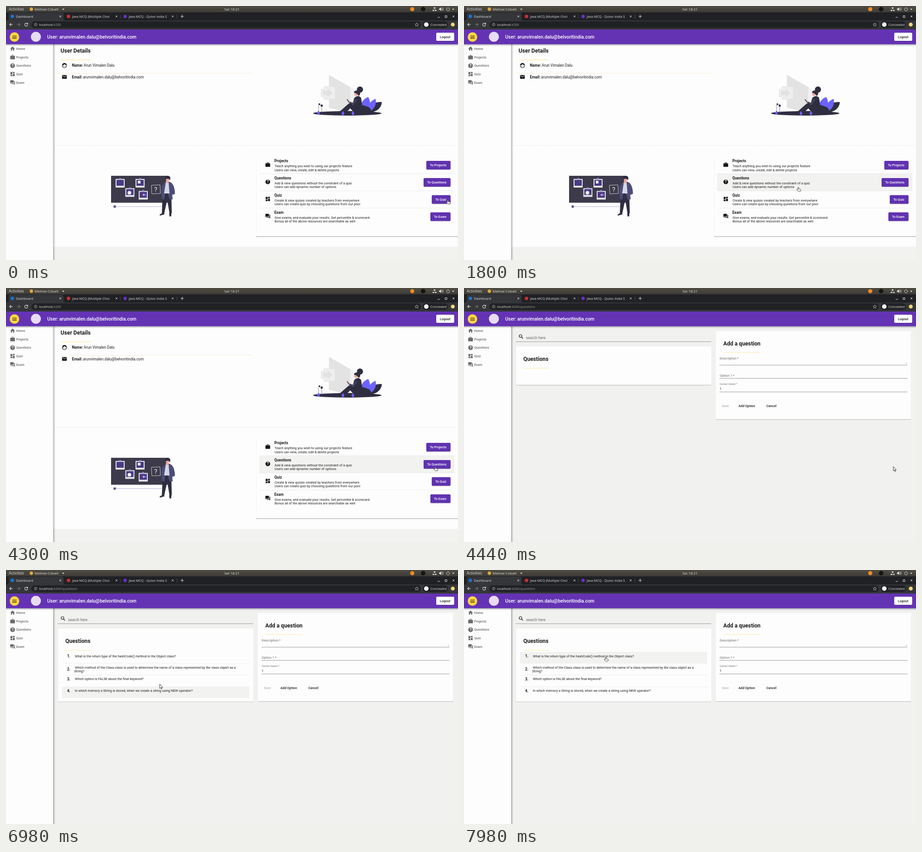
These frames come from a looping animation (998 px wide and 561 px high, 8 s). An HTML page:

```html
<!DOCTYPE html>
<html lang="en">
<head>
<meta charset="utf-8">
<title>Quiz dashboard</title>
<style>
  html, body { margin: 0; width: 100%; height: 100%; overflow: hidden; background: #f2f2f1; }
  svg { display: block; width: 998px; height: 561px; font-family: Roboto, sans-serif; }
  .ui { font-family: "Open Sans", "Noto Sans", sans-serif; }
</style>
</head>
<body>
<svg id="stage" viewBox="0 0 998 561"></svg>
<script>
const DURATION = 8000;
const PAGE_SWAP = 4290;
const LIST_LOADED = 4700;
const INK = '#1c1c1c', GREY = '#6b6b6b', PURPLE = '#6433b4', DARK = '#2f2e41', VIOLET = '#6c63ff';
const EMAIL = 'arunvimalen.dalu@belvoritindia.com';

// Markup helpers
const rect = (x, y, w, h, fill, extra = '') =>
  `<rect x="${x}" y="${y}" width="${w}" height="${h}" fill="${fill}" ${extra}/>`;
const circle = (x, y, r, fill, extra = '') =>
  `<circle cx="${x}" cy="${y}" r="${r}" fill="${fill}" ${extra}/>`;
const path = (d, fill, extra = '') => `<path d="${d}" fill="${fill}" ${extra}/>`;
const stroke = (d, color, width = 1, extra = '') =>
  `<path d="${d}" fill="none" stroke="${color}" stroke-width="${width}" ${extra}/>`;
const text = (x, y, str, size = 7.25, fill = INK, weight = 400, extra = '') =>
  `<text x="${x}" y="${y}" font-size="${size}" fill="${fill}" font-weight="${weight}" ${extra}>${str}</text>`;
const ui = (x, y, str, size, fill = '#dedede', extra = '') => text(x, y, str, size, fill, 400, `class="ui" ${extra}`);
const group = (id, content) => `<g id="${id}">${content}</g>`;

// Icons live on a 24-unit grid, centred on (x, y)
const ICONS = {
  home: 'M10 20v-6h4v6h5v-8h3L12 3 2 12h3v8z',
  work: 'M20 6h-4V4q0-2-2-2h-4q-2 0-2 2v2H4Q2 6 2 8v11q0 2 2 2h16q2 0 2-2V8q0-2-2-2zm-6 0h-4V4h4z',
  board: 'M3 13h8V3H3zm0 8h8v-6H3zm10 0h8V11h-8zm0-18v6h8V3z',
  forum: 'M21 6h-2v9H6v2q0 1 1 1h11l4 4V7q0-1-1-1zm-4 6V3q0-1-1-1H3Q2 2 2 3v14l4-4h10q1 0 1-1z',
  mail: 'M20 4H4Q2 4 2 6v12q0 2 2 2h16q2 0 2-2V6q0-2-2-2zm0 4l-8 5-8-5V6l8 5 8-5z',
};
function icon(name, x, y, fill) {
  if (name === 'help')
    return circle(x, y, 5.2, fill) + text(x, y + 3, '?', 8.5, '#fff', 700, 'text-anchor="middle"');
  return path(ICONS[name], fill, `transform="translate(${x - 6.24} ${y - 6.24}) scale(.52)"`);
}

function browser() {
  const tab = (x, title, color, close) =>
    circle(x, 23, 3.7, color) + ui(x + 8, 25.6, title, 7.4) +
    stroke(`M${close - 2} 21l4 4m0-4l-4 4`, '#e0e0e0', .9);
  return rect(0, 0, 998, 14, 'url(#panel)') +
    ui(6, 10, 'Activities', 8.2) + circle(56, 7, 3.8, '#e0a83a') + ui(63, 10, 'Mellow Cobalt', 8) +
    path('M124 6h5l-2.5 3z', '#ddd') + ui(482, 10, 'Sat 18:21', 7.9) +
    circle(897, 7, 4.6, '#f08a24') + circle(921, 7, 5, '#151515') +
    path('M944.500 3h3.500v3h-3.500zM942 8.500h3.500v2.500H942zM947 8.500h3.500v2.500H947z', '#ddd') +
    path('M956 5.500h2l3-2.500v8l-3-2.500h-2z', '#ddd') + stroke('M962.500 4.500q2 2.500 0 5M964 3q3 4 0 8', '#ddd', .8) +
    stroke('M974 4.500a3.500 3.500 0 1 0 4 0M976 2.500v4', '#ddd', 1) + path('M985 6h5l-2.500 3z', '#ddd') +
    rect(0, 14, 998, 18, '#202124') + path('M3 32Q6 32 6 28V18q0-3 3-3H124q3 0 3 3V28q0 4 3 4z', '#35363a') +
    rect(0, 32, 998, 20, '#35363a') +
    tab(14, 'Dashboard', '#1976d2', 120) + tab(138, 'Java MCQ (Multiple Choi', '#d32f2f', 244) +
    tab(263, 'Java MCQ - Quivo India S', '#6f2bd0', 368) +
    stroke('M252.500 19v9M377.500 19v9', '#55565a', .7) + stroke('M385.500 23h7M389 19.500v7', '#ddd', 1) +
    stroke('M953 25h5M969.500 21.500h4v4h-4zM986 21l4 4m0-4l-4 4', '#ddd', 1) +
    stroke('M15 41H8m3-3l-3 3 3 3', '#e3e3e3', 1.1) + stroke('M24 41h7m-3-3l3 3-3 3', '#77787c', 1.1) +
    stroke('M47.500 39.500a3.300 3.300 0 1 0 .3 2.500M48 37.500v2.500h-2.500', '#e3e3e3', 1.1) +
    rect(56, 34, 860, 14.500, '#202124', 'rx="7.2"') +
    circle(65.500, 41, 3, 'none', 'stroke="#bbb" stroke-width=".8"') + stroke('M65.500 40.500v2M65.500 39v.8', '#ccc', .8) +
    ui(73, 43.700, 'localhost:<tspan fill="#9c9da0">4200<tspan id="route">/questions</tspan></tspan>', 7.2) +
    path('M907 37.300l1.200 2.500 2.700.3-2 1.900.6 2.700-2.500-1.400-2.500 1.400.6-2.700-2-1.900 2.700-.3z', 'none', 'stroke="#ddd" stroke-width=".7"') +
    rect(920, 34, 56, 14.500, '#202124', 'rx="7.2"') + circle(928, 41, 5, '#f1f1f1') +
    ui(937, 43.700, 'Concealed', 7.4) + circle(986.500, 41, 4.300, '#f2d675');
}

function header() {
  return rect(0, 84, 998, 5, 'url(#down)') + rect(0, 52, 998, 32.500, PURPLE) +
    circle(18.700, 68.500, 10.500, '#ffd740') + stroke('M14 66h9.500M14 68.700h9.500M14 71.400h9.500', '#222', 1.1) +
    circle(66, 68, 11, '#e6dcf5') + text(91, 71.800, 'User: ' + EMAIL, 10.4, '#fff', 500) +
    rect(950, 59, 39.500, 18, '#fff', 'rx="2" filter="url(#lift)"') + text(958, 71, 'Logout', 7.4, INK, 500);
}

function sidebar() {
  const items = [['Home', 'home'], ['Projects', 'work'], ['Questions', 'help'], ['Quiz', 'board'], ['Exam', 'forum']];
  return rect(104, 84, 5, 477, 'url(#right)') + rect(0, 84, 104, 477, '#fdfdfd') +
    items.map(([label, name], i) => {
      const y = 94.300 + i * 18.700;
      return icon(name, 14.500, y, GREY) + text(22.500, y + 2.600, label, 7.28, GREY, 500);
    }).join('');
}

function reader() {
  return path('M713 152L760 179V236L713 225z', '#e3e3e3') + path('M760 179l17 10v40l-17 6z', '#f1f1f1') +
    path('M696 184h6v-6h25v28h-25v-6h-6z', '#eee', 'stroke="#e0e0e0"') +
    path('M700 187h10v-5l11 10-11 10v-5h-10z', '#e2e2e2') +
    `<ellipse cx="753.500" cy="237" rx="75.500" ry="5" fill="${DARK}"/>` +
    path('M795 234Q798 212 830 212Q828 231 806 235z', DARK) +
    path('M786 230Q780 208 800 201Q809 219 797 233z', VIOLET) + path('M797 232Q800 211 816 205Q820 222 804 233z', VIOLET) +
    path('M774 236Q780 214 794 221Q807 223 807 236z', DARK) +
    circle(773, 194, 4.500, '#f3a6a0') + circle(781.500, 184.500, 6.800, DARK) +
    path('M768 191Q770 185 778 187Q786 191 779 199Q776 193 768 191z', DARK) +
    path('M769 203Q778 195 784 203L789 235H769L766 214z', DARK) +
    path('M787 237L765 217Q760 212 755 217L738 232 722 235 725 239H747L760 226 771 238z', DARK) +
    stroke('M774 206L767 216 757 212', '#45435c', 3.500) + circle(757, 211, 2.200, '#f3a6a0') +
    stroke('M753 206l4 6', DARK, 1.5) +
    stroke('M690 237V219M697 237V221', '#6b6a80', .8) + circle(692, 217, 2, DARK) + circle(697, 220, 2.500, DARK) +
    [[690, 237], [766, 238], [744, 238]].map(([x, y]) => path(`M${x} ${y - 6}q5 5 1 9h-2q-4-4 1-9z`, VIOLET)).join('');
}

function teacher() {
  const polaroid = ([x, y]) => rect(x, y, 20, 19, '#e6e6ea') + rect(x + 2, y + 2, 16, 13, '#4b3a86') + rect(x + 8, y - 2, 4, 3, '#8f88d8');
  return rect(232, 375, 126, 59.500, '#3c3a4b') +
    [[242, 382], [286, 382], [263.500, 402.500], [293, 408.500]].map(polaroid).join('') +
    rect(291, 386, 6, 6, '#e8e8f0') + circle(272.500, 412.500, 4, '#eee') + circle(304, 417, 2.300, '#f0a0b0') + circle(308, 417, 2, VIOLET) +
    stroke('M321 396l19-1 1 19-19 1z', '#ddd', .9) + text(330.500, 410.500, '?', 15, '#eee', 400, 'text-anchor="middle"') +
    stroke('M240 443H344', '#aaa2d6', .9) + rect(237.500, 440.500, 5, 5, '#5c4a9c') +
    path('M346 414H365L366 458H361L356 428 349 460H344z', DARK) +
    path('M339 461q5-5 10-3l1 2-10 3zM360 458h5v6q-3 2-4 0z', DARK) +
    path('M350 390Q358 385 366 391Q373 399 373 415L367 417 368 427H361L353 400 350 427H345Q342 410 344 398z', '#4c4d78') +
    path('M353 389h6l2 25h-12z', '#d5d7e6') + path('M353 386h6v4q-3 3-6 0z', '#f3a6a0') +
    circle(357, 382, 4.500, '#f3a6a0') + path('M351 383Q351 374 358 375Q365 376 362 385Q360 379 351 383z', DARK);
}

function dashboard() {
  const rows = [
    ['Projects', 'work', 928, 'Teach anything you wish to using our projects feature', 'Users can view, create, edit &amp; delete projects'],
    ['Questions', 'help', 922, 'Add &amp; view questions without the constraint of a quiz', 'Users can add dynamic number of options'],
    ['Quiz', 'board', 940, 'Create &amp; view quizes created by teachers from everywhere', 'Users can create quiz by choosing questions from our pool'],
    ['Exam', 'forum', 937, 'Give exams, and evaluate your results. Get percentile &amp; scorecard.', 'Bonus all of the above resources are searchable as well'],
  ];
  const row = ([title, name, left, first, second], i) => {
    const y = 332.500 + i * 37.900;
    return rect(559, y, 431, 38, '#f2f2f1', `id="tile${i}"`) +
      (i ? stroke(`M559 ${y}H990`, '#e9e8ee', .8) : '') +
      icon(name, 578, y + 18, '#171717') + text(592.500, y + 12.500, title, 8.2, INK, 700) +
      text(593, y + 23.700, first) + text(593, y + 32, second) +
      rect(left, y + 9.500, 981.500 - left, 19, '#6031b0', 'rx="2" filter="url(#lift)"') +
      text(left + 8, y + 21.700, 'To ' + title, 7.28, '#fff', 500);
  };
  return rect(104, 84, 894, 448, '#fdfdfd') +
    text(120.500, 103, 'User Details', 12.2, INK, 700) + stroke('M121 119H186', '#ffe082', 1) +
    circle(129, 131.500, 4.700, 'none', 'stroke="#171717" stroke-width="1.1"') +
    path('M124 131Q128 131 129 128Q131 131 134 130Q133 126 129 126Q125 126 124 131z', '#171717') +
    circle(127.300, 132.500, .7, '#171717') + circle(130.700, 132.500, .7, '#171717') +
    text(145.500, 134, 'Name:', 8.3, INK, 700) + text(171.500, 134, 'Arun Vimalen Dalu', 8.3) +
    stroke('M113 148.500H545', '#f7f0cf', 1) + icon('mail', 129, 156.700, '#171717') +
    text(145.500, 159.500, 'Email:', 8.3, INK, 700) + text(170, 159.500, EMAIL, 8.3) +
    stroke('M106 308H998', '#e6e6ee', .9, 'stroke-dasharray="3 2"') +
    reader() + teacher() +
    stroke('M552.500 335V509', '#f0f0f2', .8) + stroke('M552 509.300H998', '#adada6', 1.2) + rows.map(row).join('');
}

const LIST_ROWS = [
  { top: 181, height: 25, base: 193, lines: ['What is the return type of the hashCode() method in the Object class?'] },
  { top: 206, height: 26, base: 221.700, lines: ['Which method of the Class.class is used to determine the name of a class represented by the class object as a', 'String?'] },
  { top: 232, height: 26, base: 243.700, lines: ['Which option is FALSE about the final keyword?'] },
  { top: 258, height: 25, base: 269.300, lines: ['In which memory a String is stored, when we create a string using NEW operator?'] },
];

function questions() {
  const listRow = ({ top, height, base, lines }, i) =>
    rect(123.500, top, 413.500, height, '#f2f2f1', `id="item${i}"`) +
    (i ? stroke(`M126 ${top}H537`, '#e9e9e9', .8) : '') +
    text(135, base + .3, `${i + 1}.`, 8.3, INK, 700) +
    lines.map((line, k) => text(k ? 150.500 : 152, lines.length > 1 ? 217.700 + k * 8.300 : base - .5, line)).join('');
  const underline = (y, left, right) => stroke(`M${left} ${y}H${right}`, '#8f8f8c', .9);
  return rect(104, 84, 894, 477, '#f1f1f0') +
    circle(124.800, 106, 3, 'none', `stroke="${INK}" stroke-width="1.2"`) + stroke('M127 108.200l3.200 3.200', INK, 1.4) +
    text(137, 113, 'search here', 8.3, GREY) + underline(118.600, 114, 546) +
    rect(114.500, 129, 431.500, 85, '#fdfdfd', 'id="card" rx="2" filter="url(#lift)"') +
    text(131, 161, 'Questions', 12.2, INK, 700) + stroke('M131 177.200H188', '#ffe9a0', 1) +
    group('list', LIST_ROWS.map(listRow).join('')) +
    rect(556, 95, 431.500, 195, '#fdfdfd', 'rx="2" filter="url(#lift)"') +
    text(572.500, 126.700, 'Add a question', 12.2, INK, 700) + stroke('M573 142.300H655', '#ffe9a0', 1) +
    text(564.500, 158.300, 'Description *', 7.28, GREY) + underline(170.300, 564, 979) + stroke('M975 168l3-3M977 168l1-1', '#888', .7) +
    text(564.500, 195.500, 'Option 1 *', 7.4, GREY) + underline(199.600, 564, 979) +
    text(564.500, 214, 'Correct Option *', 5.5, GREY) + text(564.500, 224.700, '1', 7.4) + underline(229.600, 564, 979) +
    text(569, 262.700, 'Save', 7.28, '#b5b3bd', 500) + text(606, 262.700, 'Add Option', 7.28, INK, 500) +
    text(667.500, 262.700, 'Cancel', 7.28, INK, 500);
}

const pointers = group('pointer',
  path('M0 0V9.500L2.200 7.500 3.600 10.800 5.200 10.100 3.800 7H6.600z', '#fff', 'id="arrow" stroke="#222" stroke-width=".9"') +
  path('M2 0q1 0 1 1V4l4 .8q1.200.3 1 1.700L7.400 9.500H1.600L-1.800 6.200q-.3-1.500 2.800-.5V1Q1 0 2 0z', '#fff', 'id="hand" stroke="#222" stroke-width=".9" transform="translate(-1.800 .3) scale(.92)"'));

const fade = (id, x2, y2) => `<linearGradient id="${id}" x2="${x2}" y2="${y2}">
  <stop stop-color="#000" stop-opacity=".3"/><stop offset="1" stop-color="#000" stop-opacity="0"/></linearGradient>`;

document.getElementById('stage').innerHTML = `<defs>${fade('down', 0, 1)}${fade('right', 1, 0)}
  <linearGradient id="panel" x2="0" y2="1"><stop stop-color="#504d44"/><stop offset="1" stop-color="#3d3b35"/></linearGradient>
  <filter id="lift" x="-10%" y="-10%" width="120%" height="130%">
    <feDropShadow dx="0" dy=".8" stdDeviation=".7" flood-opacity=".3"/></filter></defs>` +
  group('dashboard', dashboard()) + group('questions', questions()) + sidebar() + header() + browser() + pointers;

// Pointer path: time, x, y
const TRACK = [
  [0, 975.500, 428], [500, 975.500, 428], [980, 922, 420.500], [1650, 738, 400], [1800, 738, 400],
  [2450, 948, 394.500], [5250, 948, 394.500], [5880, 788.500, 418.500], [6250, 660, 465],
  [6700, 352, 275], [6953, 339.500, 252], [7560, 326, 226], [7980, 313, 192], [DURATION, 313, 192],
];
// Hovered rows: id, start, end
const HOVERS = [
  ['tile0', 0, 0], ['tile1', 1350, PAGE_SWAP], ['tile2', 600, 1350], ['tile3', 0, 0],
  ['item0', 7760, DURATION], ['item1', 7480, 7760], ['item2', 7000, 7480], ['item3', 6680, 7000],
];

const byId = id => document.getElementById(id);
const show = (id, visible) => byId(id).setAttribute('display', visible ? 'inline' : 'none');

function pointerAt(t) {
  const next = Math.max(1, TRACK.findIndex(key => key[0] > t));
  const [t0, x0, y0] = TRACK[next - 1], [t1, x1, y1] = TRACK[next];
  const p = (t - t0) / (t1 - t0);
  return [x0 + (x1 - x0) * p, y0 + (y1 - y0) * p];
}

const BEAT = 140;
function recordedTime(t) {
  const rest = t % BEAT;
  const step = rest < 100 ? 0 : rest < 120 ? 1 : 2;
  return t - rest + step * BEAT / 3;
}

function render(t) {
  const onQuestions = t >= PAGE_SWAP, loaded = t >= LIST_LOADED;
  show('dashboard', !onQuestions);
  show('questions', onQuestions);
  byId('route').textContent = onQuestions ? '/questions' : '';
  show('list', loaded);
  byId('card').setAttribute('height', loaded ? 161.500 : 85);
  HOVERS.forEach(([id, start, end]) => show(id, t >= start && t < end));
  const pointing = !onQuestions || t >= 7000;
  show('hand', pointing);
  show('arrow', !pointing);
  byId('pointer').setAttribute('transform', `translate(${pointerAt(t)})`);
}

const start = performance.now();
function tick() {
  render(recordedTime((performance.now() - start) % DURATION));
  requestAnimationFrame(tick);
}
tick();
</script>
</body>
</html>
```
